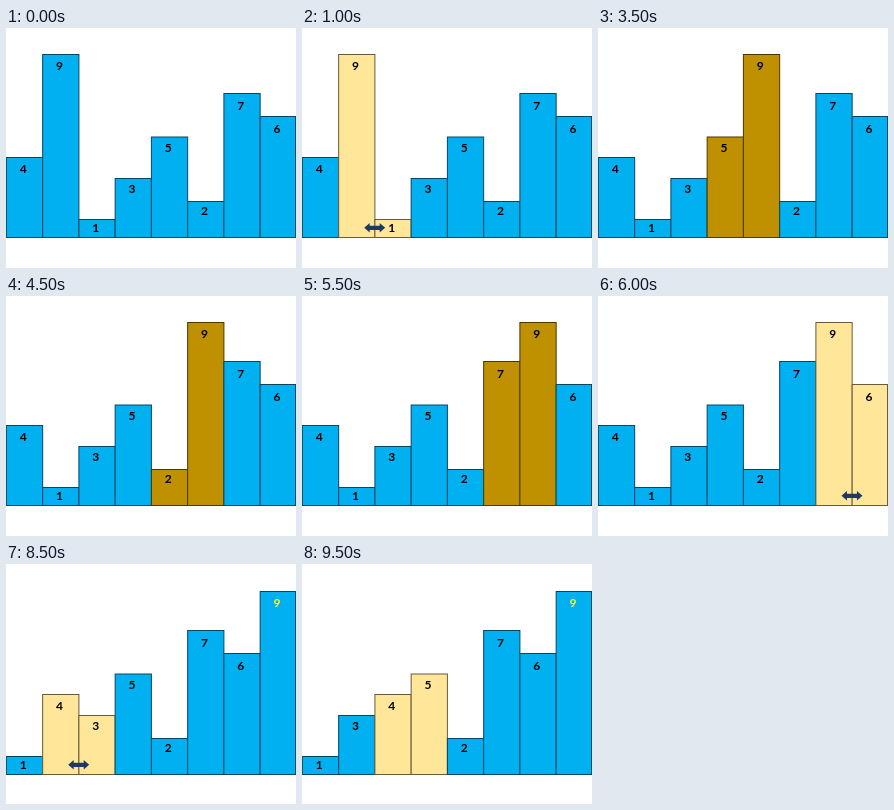
Write an HTML page that moves like this. It is 290 by 240 pixels and loops after 10 s.

```html
<!DOCTYPE html>
<html lang="en">
<head>
<meta charset="utf-8">
<title>Bubble sort</title>
<style>
  html, body { margin: 0; width: 100%; height: 100%; overflow: hidden; background: #fff; }
  svg { display: block; width: 290px; height: 240px; }
  .step { visibility: hidden; animation: show 10s step-end infinite; }
  @keyframes show {
    0% { visibility: visible; }
    5%, 100% { visibility: hidden; }
  }
  rect { fill: #00b0f0; stroke: #0b4660; stroke-width: 1; }
  .compare rect { fill: #ffe699; stroke: #675b3a; }
  .swap rect { fill: #bf9000; stroke: #4a3800; }
  text { font: 700 12px Lato, "Open Sans", sans-serif; text-anchor: middle; fill: #000; }
  .done text { fill: #ff0; }
  .arrow { fill: #203864; }
</style>
</head>
<body>
<svg id="stage" viewBox="0 0 290 240"></svg>
<script>
  const STEP = 500, LOOP = 10000, COUNT = LOOP / STEP;
  const BAR = 36.25, BASE = 209.5;
  // value: [bar height, label centre below the bar top]
  const BARS = {
    1: [18, 9], 2: [36, 10], 3: [59, 11], 4: [80, 12],
    5: [100.5, 11.5], 6: [121, 13], 7: [144, 13], 9: [183, 12]
  };
  const edge = i => Math.min(i * BAR + 0.4, 289.5);

  // Every state of the bubble sort, in order
  function sortSteps(list) {
    const steps = [];
    let sorted = 0;
    const add = (kind, at, arrow) =>
      steps.push({ list: [...list], kind, at, arrow, sorted, drop: sorted && kind ? 1 : 0 });
    add();
    while (steps.length < COUNT) {
      for (let i = 0; i < list.length - 1 - sorted; i++) {
        const wrong = list[i] > list[i + 1];
        // only a pair in the wrong order gets an arrow
        add('compare', i, wrong);
        if (wrong) {
          [list[i], list[i + 1]] = [list[i + 1], list[i]];
          add('swap', i);
        }
      }
      sorted++;
      add();
    }
    return steps.slice(0, COUNT);
  }

  function drawBar(step, value, i) {
    const [height, label] = BARS[value];
    const x = edge(i), top = BASE - height;
    const active = step.kind && (i === step.at || i === step.at + 1);
    const done = i >= step.list.length - step.sorted;
    const name = active ? step.kind : done ? 'done' : '';
    return `<g class="${name}">
      <rect x="${x}" y="${top}" width="${edge(i + 1) - x}" height="${height}"/>
      <text x="${i * BAR + 17.2}" y="${top + label + 3}">${value}</text></g>`;
  }

  function drawArrow(at) {
    const x = (at + 1) * BAR + 0.2;
    return `<path class="arrow" transform="translate(${x} 199.8)"
      d="M-10.5 0l5.5-4.8v2.7h10v-2.7l5.5 4.8l-5.5 4.8v-2.7h-10v2.7z"/>`;
  }

  document.getElementById('stage').innerHTML =
    sortSteps([4, 9, 1, 3, 5, 2, 7, 6]).map((step, n) =>
      `<g class="step" style="animation-delay:${n * STEP - LOOP}ms" transform="translate(0 ${step.drop})">
        ${step.list.map((value, i) => drawBar(step, value, i)).join('')}
        ${step.arrow ? drawArrow(step.at) : ''}
      </g>`).join('');
</script>
</body>
</html>
```
